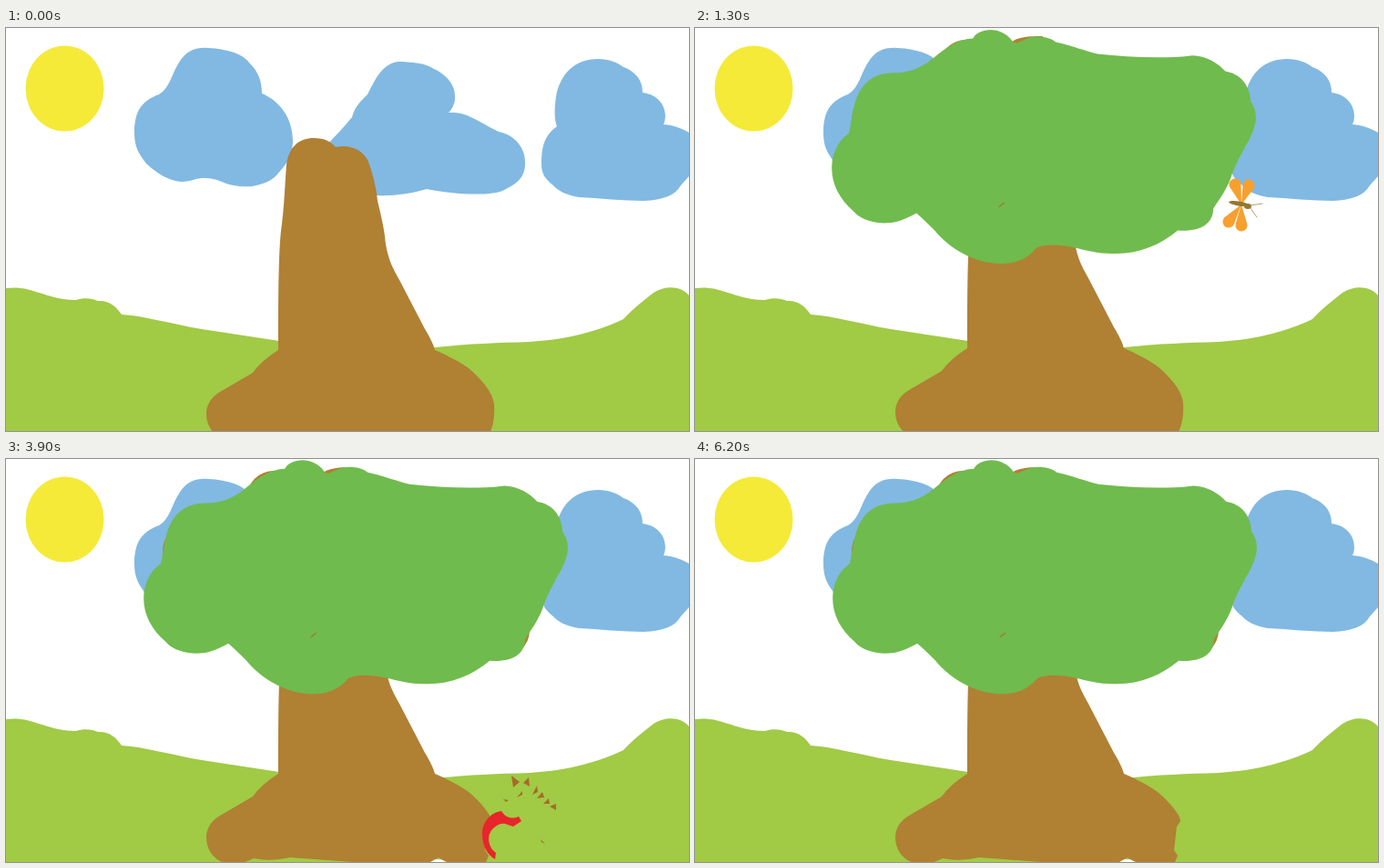
Write an HTML page with a canvas that moves like this. It is 750 px wide and 443 px high and loops after 6.3 s.

```html
<!DOCTYPE html>
<html lang="en">
<head>
<meta charset="utf-8">
<title>Growing tree</title>
<style>
html, body { margin: 0; height: 100%; overflow: hidden; background: #fff; }
canvas { display: block; width: 100vw; height: 100vh; }
</style>
</head>
<body>
<canvas id="stage" width="750" height="443"></canvas>
<script>
const ctx = document.getElementById('stage').getContext('2d');
const LOOP = 6300, STEP = 100;
const BROWN = '#b08033', GRASS = '#a1ca45', LEAF = '#70bb4d',
      SKY = '#81b9e2', RED = '#e8252b', ORANGE = '#f7a02f', SPIKE = '#a8692c';

const clouds = [
  'M141,115C141,90 150,80 168,73C180,66 182,50 190,38C198,24 210,21 222,22C245,23 260,29 267,38C277,48 281,58 281,72C300,80 315,98 315,125C314,145 305,152 298,161C288,172 268,177 250,173C235,170 232,164 215,165C205,166 203,169 192,169C178,168 165,159 154,149C145,137 141,130 141,115Z',
  'M354,127C362,118 372,108 380,98C383,86 390,80 397,73C405,58 412,40 430,37C445,37 462,39 470,45C485,52 494,64 493,77C493,84 489,90 486,93C505,92 512,99 541,114C558,117 571,132 570,149C570,165 560,172 545,179C530,185 490,183 462,177C445,182 425,185 407,184L380,184L350,160Z',
  'M588,150C588,128 592,118 605,108C602,100 602,90 604,75C609,49 626,34 650,34C662,34 672,38 678,43C692,48 699,58 699,71C715,73 724,84 724,97Q724,102 722,106C735,107 743,111 750,115V163L741,173C735,184 722,189 700,190C680,190 650,187 629,186C615,184 605,178 601,173C592,166 588,160 588,150Z'
].map(d => new Path2D(d));
const hill = new Path2D('M0,286C20,284 25,288 53,296C65,299 75,299 77,299C85,296 95,297 101,300C113,299 121,306 127,315C150,316 180,325 215,331L300,344L471,351C510,347 540,346 575,345C620,342 650,333 678,320C690,307 700,300 711,291C725,282 742,284 750,294V443H520Q475,437 385,443H0Z');
const trunk = new Path2D('M299,354C299,300 299,240 303,215C306,190 306,175 308,150C311,130 322,121 338,121C350,121 357,125 362,131C378,127 395,135 399,150C405,168 407,180 408,190C414,215 416,225 417,238C420,255 425,265 432,277L460,331C466,341 469,347 471,354C485,360 500,368 508,374C520,384 535,400 536,414C537,430 534,440 530,448C520,460 490,457 475,446C465,452 455,457 447,456L312,446Q290,451 272,447C240,463 220,445 220,424C220,412 228,404 235,400L271,379Q280,366 299,354Z');
const leftBranch = new Path2D('M304,162C290,143 275,130 263,112C262,95 262,85 259,80C255,66 243,63 235,64C222,58 206,59 200,66C190,70 172,80 172,103C173,120 185,128 190,140L183,180C183,200 195,210 210,211C228,210 240,204 254,197C265,212 285,226 304,230L340,200Z');
const midBranch = new Path2D('M303,165C298,140 301,130 304,128L307,73L285,66C285,25 305,14 320,14C330,14 337,19 340,22C350,10 362,9 382,9L372,73C365,85 366,105 364,131L350,165Z');
const rightBranch = new Path2D('M400,165L446,145C436,135 434,120 434,95L430,60L484,56L489,72C500,58 520,50 560,47Q575,45 582,47L560,107L532,112C530,120 527,128 525,132L530,147L553,165L515,208L486,190C465,204 440,213 413,228L380,190Z');
const canopy = new Path2D('M151,153C151,135 160,122 170,115C173,100 174,90 177,80C183,62 195,50 215,49C235,49 247,45 262,33C275,22 290,11 306,11C313,-1 338,-3 350,15L354,16L368,10C380,8 390,10 397,15C415,19 430,25 443,28C475,31 510,34 545,30C560,29 575,38 583,47C600,50 610,62 611,80C619,92 619,104 609,123C598,142 592,155 589,165C583,180 575,190 570,198C570,215 555,224 531,222C512,238 488,248 462,247.5C445,248 430,244 418,241C400,237 385,237 376,241C365,255 350,259 335,258.5C308,258 280,242 264,222Q252,210 244,203C230,211 220,214 208,214C190,213 180,207 175,201C160,188 151,172 151,153Z');
const apple = new Path2D('M526,405C527,390 540,386 553,387C565,389 570,396 575,405C587,411 596,420 596,430C594,440 585,443 575,446H545C535,440 527,432 526,420Z');
const appleRim = new Path2D('M544,387C530,389 523,401 523,412C523,426 529,435 537,440L538,433C530,428 529,417 531,412C535,404 542,400 548,401L557,404L566,398L563,393C556,396 549,395 544,387Z');
const bite = new Path2D('M546,384L532,392L533,398L529,404L526,430L530,436L526,446V460H600V384Z');

const buds = [[301, 41], [373, 39], [452, 62], [580, 79], [540, 192], [208, 106], [209, 166], [345, 226]];
const spikes = ['M555,348L564,355L557,361Z', 'M574,350L575,360L568,356Z', 'M583,359L584,366L578,369Z',
  'M589,366L591,372L583,373Z', 'M596,373L597,379L590,379Z', 'M604,379L604,386L597,382Z',
  'M567,365L567,369L561,372Z', 'M546,374L552,375L549,377Z', 'M587,418L592,423L588,421Z'].map(d => new Path2D(d));

// How far the tree has crept upward: [time, pixels].
const riseKeys = [[0, 0], [1000, 0], [1300, 2], [2400, 4], [3900, 8], [5900, 14], [6200, 8], [6300, 8]];

function riseAt(t) {
  const i = riseKeys.findIndex(([time]) => time > t);
  const [t0, a] = riseKeys[i - 1], [t1, b] = riseKeys[i];
  return a + (b - a) * (t - t0) / (t1 - t0);
}

function fill(path, color) {
  ctx.fillStyle = color;
  ctx.fill(path);
}

function ellipse(x, y, rx, ry, color, angle = 0) {
  ctx.beginPath();
  ctx.ellipse(x, y, rx, ry, angle, 0, Math.PI * 2);
  ctx.fillStyle = color;
  ctx.fill();
}

function line(x0, y0, x1, y1, width, color) {
  ctx.beginPath();
  ctx.moveTo(x0, y0);
  ctx.lineTo(x1, y1);
  ctx.lineWidth = width;
  ctx.strokeStyle = color;
  ctx.lineCap = 'round';
  ctx.stroke();
}

// A drop with its tip at (x0, y0) and a round end at (x1, y1).
function petal(x0, y0, x1, y1, radius, color) {
  const angle = Math.atan2(y1 - y0, x1 - x0);
  ctx.beginPath();
  ctx.moveTo(x0, y0);
  ctx.arc(x1, y1, radius, angle - 1.8, angle + 1.8);
  ctx.fillStyle = color;
  ctx.fill();
}

function shifted(dx, dy, draw) {
  ctx.save();
  ctx.translate(dx, dy);
  draw();
  ctx.restore();
}

function drawBranches(t, rise) {
  if (t >= 100) {
    fill(leftBranch, BROWN);
    fill(midBranch, BROWN);
    if (t >= 300) ellipse(299 - rise * .6, 43, 30, 30, BROWN);
  }
  if (t >= 200) {
    fill(rightBranch, BROWN);
    if (t >= 300) ellipse(537 + rise, 188, 30, 30, BROWN);
  }
}

function drawCanopy(t, rise) {
  const radius = 31 + Math.max(0, t - 300) * .13;
  shifted((rise - 7) / 6, (5 - rise) / 8, () => {
    if (t < 1000) {
      ctx.beginPath();
      for (const [x, y] of buds) {
        ctx.moveTo(x + radius, y);
        ctx.arc(x, y, radius, 0, Math.PI * 2);
      }
      ctx.clip();
    }
    fill(canopy, LEAF);
    if (t >= 1000) line(335, 196, 340, 192, 1.5, '#998038');
  });
}

function drawButterfly(t) {
  const dx = (t - 1300) * .3;
  shifted(dx, 12 * Math.sin(dx / 30), () => {
    for (const [x, y] of [[593, 172], [608, 173], [586, 213], [600, 217]])
      petal(600, 194, x, y, 6.5, ORANGE);
    ellipse(597, 193, 11, 2.5, '#94782f', .15);
    ellipse(607, 196, 4, 3, '#94782f');
    line(610, 195, 623, 193, .7, '#94782f');
    line(610, 198, 617, 208, .7, '#94782f');
  });
}

function drawApple(t, rise) {
  if (t < 3300) {
    const size = Math.min(1, (t - 1900) / 400);
    ctx.save();
    ctx.translate(560, 415);
    ctx.scale(size, size);
    ctx.translate(-560, -415);
    fill(apple, RED);
    line(540, 431, 544, 433, 1, BROWN);
    ctx.restore();
    return;
  }
  shifted(0, 8 - rise, () => fill(bite, GRASS));
  if (t < 4800) fill(appleRim, RED);
  spikes.forEach((spike, i) => {
    if (t >= 3300 + i * 60 && t < 4300 + i * 80) fill(spike, SPIKE);
  });
}

function draw(t) {
  const rise = riseAt(t);
  ctx.fillStyle = '#fff';
  ctx.fillRect(0, 0, 750, 443);
  ellipse(64.5, 66.5, 43, 47, '#f5ea38');
  clouds.forEach(cloud => fill(cloud, SKY));
  fill(hill, GRASS);
  shifted(0, -rise, () => fill(trunk, BROWN));
  drawBranches(t, rise);
  if (t >= 300) drawCanopy(t, rise);
  if (t >= 900 && t < 1900) drawButterfly(t);
  if (t >= 2000) drawApple(t, rise);
}

function tick() {
  const t = performance.now() % LOOP;
  draw(Math.floor(t / STEP) * STEP);
  requestAnimationFrame(tick);
}
tick();
</script>
</body>
</html>
```
